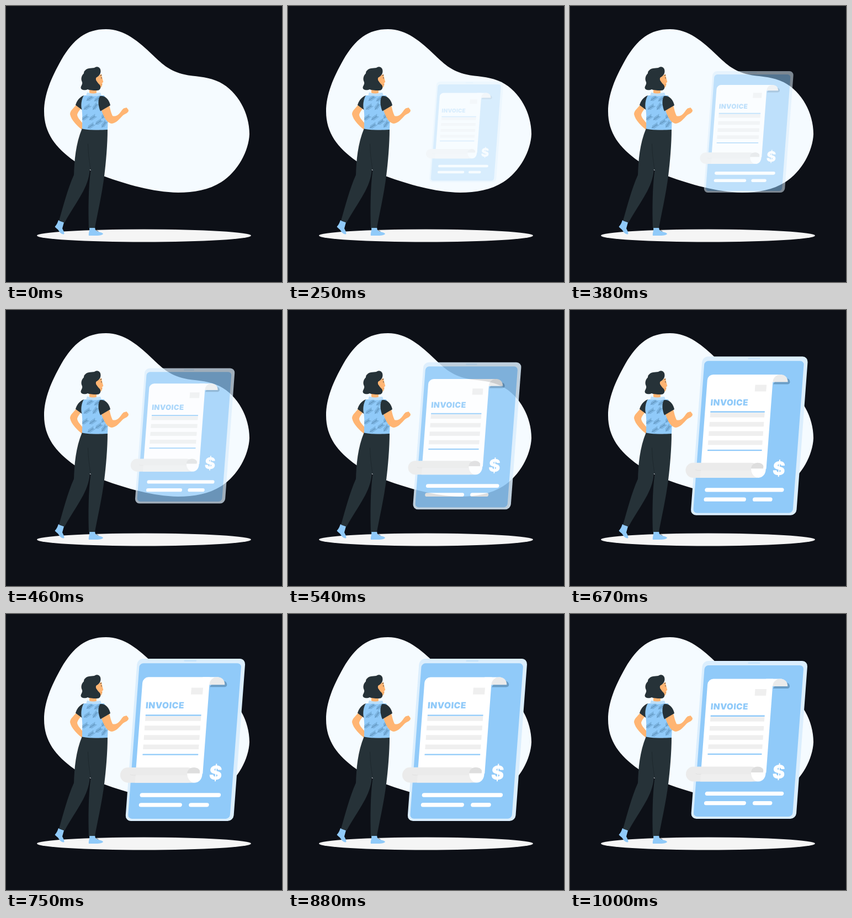
Write an HTML page with a canvas that moves like this. It is 500 px wide and 500 px high and loops after 1040 ms.

```html
<!DOCTYPE html>
<html lang="en">
<head>
<meta charset="utf-8">
<title>Invoice</title>
<style>
  html, body { margin: 0; width: 100%; height: 100%; overflow: hidden; background: #0d1017; }
  canvas { display: block; width: 500px; height: 500px; }
</style>
</head>
<body>
<canvas id="stage" width="500" height="500"></canvas>
<script>
const LOOP = 1040, FPS = 24;
const CENTER = { x: 320, y: 228 };
const SLANT = 0.075;
const C = {
  night: '#0d1017', blob: '#f5fbff', floor: '#f5f5f5', dark: '#263238', blue: '#90caf9',
  rim: '#dbeefd', speaker: '#c6e3fb', pale: '#bcdffb', skin: '#ffb573',
  paper: '#ffffff', bar: '#efefef', roll: '#ebebeb', fold: '#dedede', shade: '#6a9dc6'
};

const stage = document.getElementById('stage').getContext('2d');
const layerCanvas = document.createElement('canvas');
layerCanvas.width = layerCanvas.height = 500;
const layer = layerCanvas.getContext('2d');

function shape(g, color, d) {
  g.fillStyle = color;
  g.fill(new Path2D(d));
}

function line(g, color, width, d) {
  g.strokeStyle = color;
  g.lineWidth = width;
  g.lineCap = 'round';
  g.stroke(new Path2D(d));
}

function box(g, color, x, y, w, h, r = 0) {
  g.fillStyle = color;
  g.beginPath();
  g.roundRect(x, y, w, h, r);
  g.fill();
}

function bezier(a, b, u) {
  const v = 1 - u;
  return 3 * a * u * v * v + 3 * b * u * u * v + u * u * u;
}

// cubic-bezier(.36, -.01, .5, 1.38)
function ease(t) {
  let lo = 0, hi = 1;
  for (let i = 0; i < 30; i++) {
    const mid = (lo + hi) / 2;
    if (bezier(0.36, 0.5, mid) < t) lo = mid; else hi = mid;
  }
  return bezier(-0.01, 1.38, (lo + hi) / 2);
}

function drawScene(g) {
  g.fillStyle = C.night;
  g.fillRect(0, 0, 500, 500);
  shape(g, C.blob, `M181 42 C215 42 241 65 266 89 C284 106 298 120 330 125.5 C350 128 368 129 387 138
    C420 155 441 194 441 232 C440 262 420 300 390 319 C368 333 340 338 312 338
    C265 337 218 323 178 308.5 C155 300 138 290 124 281 C90 257 69 230 69 191
    C69 160 82 130 100 98 C122 60 145 42 181 42Z`);
  g.fillStyle = C.floor;
  g.beginPath();
  g.ellipse(250, 416, 194, 11.4, 0, 0, Math.PI * 2);
  g.fill();
}

function leaf(g, x, y, angle) {
  g.save();
  g.translate(x, y);
  g.rotate(angle);
  let d = 'M-6 0 H6';
  for (let i = -5; i <= 5; i += 2) d += `M${i} 0 l3 -3 M${i} 0 l3 3`;
  g.globalAlpha = 0.6;
  line(g, '#3f6f96', 0.6, d);
  g.restore();
}

function drawTorso(g) {
  const torso = `M141 162 L178 162 C184 180 185.5 205 184 224 C168 225 150 225 138 222.5
    C138 208 139 196 137 186 C135 178 137 167 141 162Z`;
  shape(g, C.blue, torso);
  g.save();
  g.clip(new Path2D(torso));
  const spots = [[151, 168], [146, 184], [161, 183], [142, 203], [156, 203],
                 [177, 199], [165, 169], [153, 218], [177, 215], [167, 211]];
  spots.forEach(([x, y], i) => leaf(g, x, y, i % 3 === 2 ? -0.95 : -0.6));
  g.restore();
}

function drawWoman(g) {
  shape(g, C.skin, `M129 177 C123 185 116 189 116 196 C118 207 130 218 137 223.5 L140 221 L138.5 212
    C134 207 129 201 129 197 C130 192 134 188 137 184Z`);
  shape(g, C.blue, `M95 388 L105 392 L102 403 C104 407 106.5 411 105 413.5 C99 413.5 97 409 94 405
    C92 403 90 402 88.5 400 C91 397 93 394 95 388Z`);
  shape(g, C.blue, `M151 401 L161 401 L162 406 C166 410 175 409.5 176 413 C174 415.5 168 416 160 416
    L150 416 C149 411 152 408 151 401Z`);
  line(g, C.dark, 0.7, 'M163.5 406.5 L167 408');
  shape(g, C.dark, `M138 221.5 C150 225 170 225 184 222.5 C184 250 181 285 178 308
    C174 340 166 375 161 402 L150 402 C149 370 149 330 153.5 297 L152 296 C149 330 130 350 106 392.5
    L96 389 C103 365 112 330 123 306 C124 280 126 250 138 221.5Z`);
  line(g, '#1c262b', 0.8, 'M148.5 250 C149 268 151 282 153 295');
  drawTorso(g);
  shape(g, C.dark, 'M141 162 C133 165 128 172 126 179.5 L137.5 188 C135 180 137 168 141 162Z');
  shape(g, C.skin, `M173 189 C177 200 182 212 192 213 C200 212 206 204 212 198 C216 195 221 194 222 190
    C222 187 219.5 186 218.5 184 L213 185.5 C209 189 207 194 203 197 C199 200 195 200 193 199
    C190 193 189 187 187 180Z`);
  shape(g, C.dark, 'M170 163.5 C178 161 187 169 189 180 L171 190.5 C167 182 166 170 170 163.5Z');
  shape(g, C.pale, 'M147 156.5 C155 159 163 158 171 157 L173 162 C163 164 153 162 145 162.5Z');
  shape(g, C.skin, 'M151 149 H164 V157.5 C160 159 155 158.5 151 157.5Z');
  shape(g, C.skin, `M164 129 C168 127 171 123 173 123.5 C174 129 175 133 176.3 137.5 L174.3 139.5
    C174.5 143 174 147 171 148 C167 147 163 143 162.5 137 C161.5 133 162 131 164 129Z`);
  shape(g, C.dark, `M143 117 C147 112 153 113 160 112 C164 108.5 171.5 110 171.5 118
    C171.5 124 168 127 164 129.5 C162 134 165 138 170 143 C172.5 147 171 151 168 152.5
    C160 154 150 152 148 151 C144 153 136 153 135.5 148 C136 144 139 142 138 138
    C134 130 139 124 141 122 C141 119 142 118 143 117Z`);
  shape(g, C.skin, 'M167 129 C163 128 162 132 163.5 135 C165 138 168 137 168 134Z');
  line(g, C.dark, 0.9, 'M171 126 L173 125.2 M172.8 129.6 L173 131');
  line(g, '#c9793f', 0.6, 'M172 142.6 L174 142.2');
}

function drawRoll(g) {
  box(g, C.roll, 210, 276.5, 132, 27, 13.5);
  shape(g, C.bar, 'M237 290.5 H330 L340 303.5 H236Z');
  line(g, '#dfdfdf', 0.8, 'M228 289.3 C231 290.6 234 290.3 237 290.2');
  shape(g, C.fold, 'M328 287.5 C328 281 333 276.5 340 276.5 C346 276.5 350.5 280 350.5 284 L350 287.5Z');
  shape(g, C.paper, `M328 287 H350 L352 270 H356 L354.5 289 C354 297 349 303.5 341 303.5
    C333 303 328 296 328 287Z`);
}

function drawCurl(g) {
  shape(g, C.shade, 'M368 135 H393 C396.5 135 398.5 133 398 130 C397.5 127 396 125 392 124 L372 128Z');
  shape(g, C.paper, 'M355 117.5 H384 L370 131 H366Z');
  shape(g, C.roll, 'M366.8 131 C368 122 374 117.5 381 117.5 C389 117.5 394 122 394.3 131Z');
}

function text(g, str, font, x, y, gap) {
  g.font = font;
  g.letterSpacing = gap;
  g.fillText(str, x, y);
}

function drawTablet(g) {
  drawSlanted(g, () => {
    box(g, C.rim, 229.6, 85, 190.4, 286, 10);
    box(g, C.speaker, 312, 87.5, 22, 2.4, 1.2);
    box(g, C.blue, 233.9, 93, 179.5, 274, 7);
  });
  drawCurl(g);
  drawSlanted(g, () => box(g, C.paper, 241.6, 117.5, 118.2, 170, [10, 0, 0, 0]));
  drawRoll(g);
  drawSlanted(g, () => {
    box(g, C.bar, 328.6, 136, 20.5, 12);
    for (let i = 0; i < 4; i++) box(g, C.bar, 251.4, 186.4 + i * 16.6, 98, 8.3);
    box(g, C.blue, 251.4, 183.6, 98, 2.3);
    box(g, C.blue, 251.4, 252.8, 98, 2.3);
    box(g, C.paper, 252, 321.7, 142.5, 7.2, 3.6);
    box(g, C.paper, 251.5, 339, 76, 7.2, 3.6);
    box(g, C.paper, 339.5, 339, 35.5, 7.2, 3.6);
    g.fillStyle = C.blue;
    g.textAlign = 'left';
    text(g, 'INVOICE', '900 15.3px Inter, Arial, sans-serif', 250.4, 172.8, '0.45px');
    g.fillStyle = C.paper;
    g.textAlign = 'center';
    text(g, '$', '900 34px Inter, Arial, sans-serif', 382.5, 298.3, '0px');
  });
}

function drawSlanted(g, draw) {
  g.save();
  g.transform(1, 0, -SLANT, 1, SLANT * CENTER.y, 0);
  draw();
  g.restore();
}

// The motion advances in 24 steps per second, each starting on a 10 ms tick.
function stepAt(ms) {
  let n = Math.floor(ms * FPS / 1000) + 1;
  while (n > 0 && Math.round(n * 100 / FPS) * 10 > ms) n--;
  return Math.min(n, 24);
}

function render(ms) {
  const n = stepAt(ms);
  drawScene(stage);
  if (n >= 4) {
    const p = ease(Math.min(1, n / FPS + 0.026));
    const s = 0.5 + 0.5 * p;
    layer.clearRect(0, 0, 500, 500);
    layer.save();
    layer.translate(CENTER.x, CENTER.y);
    layer.scale(s, s);
    layer.translate(-CENTER.x, -CENTER.y);
    drawTablet(layer);
    layer.restore();
    stage.globalAlpha = Math.min(1, p);
    stage.drawImage(layerCanvas, 0, 0);
    stage.globalAlpha = 1;
  }
  drawWoman(stage);
}

function tick() {
  render(performance.now() % LOOP);
  requestAnimationFrame(tick);
}
tick();
</script>
</body>
</html>
```
